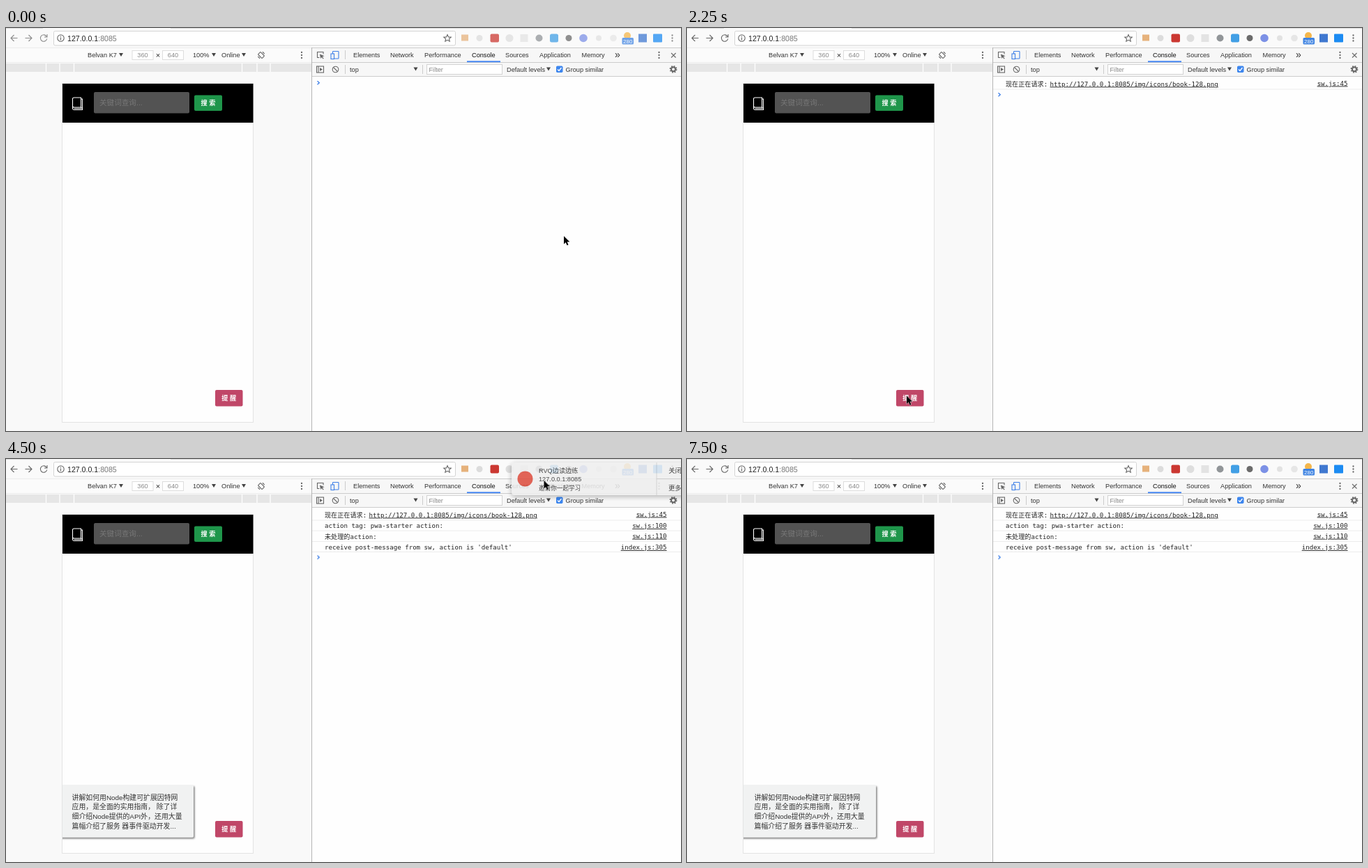
An HTML page for the animation above (7.75 s loop, 968 by 579 pixels).

```html
<!DOCTYPE html>
<html lang="zh">
<head>
<meta charset="utf-8">
<title>Notification demo</title>
<style>
html, body { margin: 0; width: 100%; height: 100%; overflow: hidden; background: #fff; }
svg { display: block; width: 100%; height: 100%; }
text { font: 9.2px "Liberation Sans", "Noto Sans CJK SC", "Noto Sans CJK", sans-serif; fill: #333; white-space: pre; }
.mono text { font: 9.12px "DejaVu Sans Mono", "Noto Sans CJK SC", "Noto Sans CJK", monospace; fill: #222; }
.mono .link { text-decoration: underline; }
.mono .src { text-anchor: end; text-decoration: underline; }
.url { font-size: 10.6px; }
.dim { fill: #888; }
.mid { text-anchor: middle; }
.btn { font-weight: bold; fill: #fff; text-anchor: middle; }
.card text { font-size: 9.88px; }
.line { fill: none; stroke: #666; stroke-width: 1.1; }
.rule { fill: none; stroke: #ccc; stroke-width: 1; }
.faint { stroke: #ececec; }

.play { animation: 7750ms step-end infinite; }
#cursor { animation-name: cursor; }
#toolbar { animation-name: focus; }
#clear { animation-name: clear; }
#first { animation-name: first; }
#rest { animation-name: rest; }
#prompt { animation-name: prompt; }
#notice { animation-name: notice; }
#icon { animation-name: icon; }
#actions { animation-name: actions; }
#card { animation-name: card; }
#hover { animation-name: hover; }

@keyframes cursor {
  0% { transform: translate(800px, 299px); }
  3.225% { transform: translate(394px, 427px); }
  6.451% { transform: translate(368px, 439px); }
  9.677% { transform: translate(331px, 495px); }
  12.903% { transform: translate(314.5px, 522px); }
  16.129% { transform: translate(315px, 528.5px); }
  38.709% { transform: translate(624px, 258px); }
  41.935% { transform: translate(630px, 248px); }
  45.161% { transform: translate(732px, 71px); }
  48.387% { transform: translate(763px, 35px); }
  51.612% { transform: translate(771.5px, 31px); opacity: 1; }
  74.193%, 100% { transform: translate(771.5px, 31px); opacity: 0; }
}
@keyframes focus { 0% { opacity: .75; } 19.354%, 100% { opacity: 1; } }
@keyframes clear { 0% { opacity: 0; } 19.354% { opacity: 1; } 25.806%, 100% { opacity: 0; } }
@keyframes first { 0% { opacity: 0; } 29.032%, 100% { opacity: 1; } }
@keyframes rest { 0% { opacity: 0; } 58.064%, 100% { opacity: 1; } }
@keyframes prompt {
  0% { transform: translateY(0); }
  29.032% { transform: translateY(17px); }
  58.064%, 100% { transform: translateY(62.5px); }
}
@keyframes notice {
  0% { transform: translateX(300px); opacity: 1; }
  32.258% { transform: translateX(137px); opacity: 1; }
  35.483% { transform: none; opacity: 1; }
  58.064% { transform: translateX(32px); opacity: .88; }
  61.290% { transform: translateX(110px); opacity: .4; }
  64.516%, 100% { transform: translateX(300px); opacity: 0; }
}
@keyframes icon { 0% { opacity: 1; } 48.387% { opacity: .4; } 51.612%, 100% { opacity: 0; } }
@keyframes actions { 0% { opacity: 0; } 48.387% { opacity: .6; } 51.612%, 100% { opacity: 1; } }
@keyframes card {
  0% { transform: translateX(-200px); }
  58.064% { transform: translateX(-2px); }
  61.290%, 100% { transform: none; }
}
@keyframes hover { 0% { opacity: 0; } 64.516% { opacity: 1; } 74.193%, 100% { opacity: 0; } }
</style>
</head>
<body>
<svg viewBox="0 0 968 579" preserveAspectRatio="none">
  <defs>
    <filter id="soft" x="-10%" y="-30%" width="120%" height="170%"><feDropShadow dx="0" dy="2" stdDeviation="3.5" flood-opacity=".32"/></filter>
    <filter id="drop" x="-5%" y="-10%" width="112%" height="130%"><feDropShadow dx="1.5" dy="2" stdDeviation="1.3" flood-opacity=".5"/></filter>
    <clipPath id="screen"><rect x="81" y="80" width="273" height="486"/></clipPath>
    <path id="caret" d="M0 0h6l-3 5z" fill="#444"/>
    <g id="kebab" fill="#666"><circle cy="-4" r="1.15"/><circle r="1.15"/><circle cy="4" r="1.15"/></g>
  </defs>
  <rect width="968" height="579" fill="#fefefe"/>

  <!-- Browser toolbar -->
  <rect width="968" height="28" fill="#fafafa"/>
  <path class="rule" d="M0 .3H53M236 .3H968" stroke-opacity=".8"/>
  <rect x="68.5" y="4.5" width="576" height="20.5" rx="2" fill="#fff" stroke="#d4d4d4"/>
  <g class="line">
    <circle cx="78.5" cy="14.5" r="4.7"/><path d="M78.5 13.5v4M78.5 11.3v1.2"/>
    <path d="M633 9.5l1.5 3.4 3.7.3-2.8 2.4.9 3.6-3.3-1.9-3.2 1.9.8-3.6-2.8-2.4 3.7-.3z"/>
  </g>
  <text class="url" x="88" y="18.5" style="fill:#222">127.0.0.1<tspan fill="#777">:8085</tspan></text>
  <g id="toolbar" class="play">
    <path class="line" d="M16.5 14.5H7m4.5-4.5L7 14.5l4.5 4.5M27.500 14.500H37m-4.500-4.500l4.500 4.500-4.500 4.500M58.200 12.200A4.700 4.700 0 1 0 58.700 15.500M59 9v4h-4"/>
    <rect x="653" y="9.500" width="10" height="9" fill="#e6b27c"/>
    <circle cx="679" cy="14.500" r="4.500" fill="#dcdcdc"/>
    <rect x="694.500" y="8.500" width="12.500" height="12" rx="2" fill="#cb3832"/>
    <circle cx="722" cy="14.500" r="5.500" fill="#dedede"/>
    <rect x="737.500" y="9" width="11" height="11" fill="#e3e3e3"/>
    <circle cx="764.500" cy="14.500" r="5" fill="#919598"/>
    <rect x="780" y="8.500" width="12" height="12" rx="2.500" fill="#429fe5"/>
    <circle cx="807" cy="14.500" r="4.500" fill="#6b6b6b"/>
    <circle cx="828" cy="14.500" r="5.800" fill="#7c91e6"/>
    <circle cx="850" cy="14.500" r="4" fill="#e2e2e2"/>
    <circle cx="871" cy="14.500" r="4.800" fill="#e6e6e6"/>
    <circle cx="891" cy="11" r="5" fill="#f4b64b"/>
    <rect x="883.500" y="14" width="16.500" height="9.500" rx="1.500" fill="#3e83e2"/>
    <text class="mid" x="891.700" y="21.700" style="font-size:8px;fill:#fff">280</text>
    <rect x="907" y="8.500" width="12" height="12" fill="#4078d0"/>
    <rect x="928" y="8.500" width="13" height="12" rx="1" fill="#1c8bf2"/>
    <use href="#kebab" x="955.500" y="14.500"/>
  </g>

  <!-- Device toolbar and ruler -->
  <rect y="28" width="438" height="22" fill="#fbfbfb"/>
  <path class="rule faint" d="M0 28.500H438M0 49.500H438"/>
  <g>
    <text x="117" y="42">Belvan K7</text><use href="#caret" x="162" y="36"/>
    <rect x="181" y="32.500" width="30" height="13" fill="#fff" stroke="#ddd"/><text class="mid dim" x="196" y="42">360</text>
    <text class="mid" x="218" y="42.500" style="font-size:11px">×</text>
    <rect x="224.500" y="32.500" width="30" height="13" fill="#fff" stroke="#ddd"/><text class="mid dim" x="239.500" y="42">640</text>
    <text x="268" y="42">100%</text><use href="#caret" x="295" y="36"/>
    <text x="309" y="42">Online</text><use href="#caret" x="338" y="36"/>
    <g class="line" transform="translate(366 39) rotate(-45)"><rect x="-2.500" y="-4" width="5" height="8" rx=".8"/><path d="M-4.700-2v4M4.700-2v4"/></g>
    <use href="#kebab" x="424" y="39"/>
  </g>
  <rect y="50" width="438" height="529" fill="#f9f9f9"/>
  <rect y="51" width="438" height="12" fill="#e6e6e6"/>
  <path d="M57.500 51v12M77 51v12M97.500 51v12M338.500 51v12M360 51v12M379 51v12" stroke="#fff" stroke-width="1.300"/>

  <!-- Phone page -->
  <rect x="80.500" y="79.500" width="274" height="487" fill="#fefefe" stroke="#e4e4e4"/>
  <rect x="81" y="80" width="273.500" height="56"/>
  <g fill="none" stroke="#fff" stroke-width="1.100">
    <path d="M97.500 100h10v14h-10a2 2 0 0 1-2-2v-10a2 2 0 0 1 2-2zM95.500 112v3a2.200 2.200 0 0 0 2.200 2.500h11.800V102h-2M97.500 115.700h10.500v-2"/>
  </g>
  <rect x="126" y="92" width="137" height="30.500" rx="2" fill="#535353"/>
  <text x="134" y="111" style="font-size:10.600px;fill:#777">关键词查询...</text>
  <rect x="270" y="96.500" width="40" height="22.500" rx="2" fill="#1f964b"/>
  <text class="btn" x="290" y="111">搜 索</text>
  <rect x="300" y="520" width="39.500" height="23.500" rx="2" fill="#c04768"/>
  <text class="btn" x="319.700" y="535">提 醒</text>
  <g clip-path="url(#screen)">
    <g id="card" class="play card">
      <rect x="71" y="468" width="200" height="75.500" rx="2" fill="#f1f2f2" filter="url(#drop)"/>
      <text x="96.500" y="489.500">讲解如何用Node构建可扩展因特网</text>
      <text x="96.500" y="503.300">应用，是全面的实用指南， 除了详</text>
      <text x="96.500" y="517">细介绍Node提供的API外，还用大量</text>
      <text x="96.500" y="530.800">篇幅介绍了服务 器事件驱动开发...</text>
    </g>
  </g>

  <!-- Developer tools -->
  <rect x="439" y="28" width="529" height="41" fill="#f7f7f7"/>
  <path class="rule" d="M438.500 28V579" style="stroke:#b5b5b5"/>
  <path class="rule" d="M439 28.500H968M439 49.500H968M439 69.500H968M486.500 32v13M486.500 53v13M597.500 53v13"/>
  <rect id="hover" class="play" x="758" y="29" width="60" height="20" fill="#e8e8e8"/>
  <g class="line">
    <path d="M449.500 42.500h-3v-8h8.500v3"/><path d="M450 37.500l6.500 2.700-2.800 1 2 2.500-1 .8-2-2.500-1.500 2z" fill="#666" stroke="none"/>
    <g style="stroke:#3d7fe8"><rect x="468.500" y="33.500" width="8.500" height="10.500" rx=".8"/><rect x="466" y="37" width="4.500" height="7.500" fill="#f7f7f7"/></g>
  </g>
  <text x="498" y="42">Elements</text><text x="551" y="42">Network</text><text x="600" y="42">Performance</text>
  <text x="668" y="42" style="fill:#111">Console</text><text x="716" y="42">Sources</text><text x="765" y="42">Application</text>
  <text x="825.500" y="42">Memory</text><text x="873" y="43" style="font-size:14px">»</text>
  <rect x="661" y="47.300" width="48" height="1.900" fill="#4285f4"/>
  <use href="#kebab" x="936.500" y="39"/>
  <path class="line" d="M954 36l6.500 6.500m0-6.500l-6.500 6.500"/>

  <rect id="clear" class="play" x="463" y="51" width="18" height="17" fill="#e2e2e2"/>
  <g class="line">
    <rect x="445.500" y="55" width="10" height="9"/><path d="M448 55v9"/><path d="M450 57l4 2.500-4 2.500z" fill="#666" stroke="none"/>
    <circle cx="472.500" cy="59.500" r="4.300"/><path d="M469.500 56.500l6 6"/>
    <circle cx="957" cy="59.300" r="3" stroke-width="2"/><circle cx="957" cy="59.300" r="4.600" stroke-width="1.600" stroke-dasharray="1.800 1.813"/>
  </g>
  <text x="493" y="62.500">top</text><use href="#caret" x="584.500" y="56.500"/>
  <rect x="603.500" y="52.500" width="108" height="14" fill="#fff" stroke="#d2d2d2"/>
  <text class="dim" x="606.500" y="63">Filter</text>
  <text x="718" y="62.500">Default levels</text><use href="#caret" x="775" y="56.500"/>
  <rect x="789" y="54.500" width="9.500" height="9.500" rx="1.800" fill="#3d86ee"/>
  <path d="M791 59.500l2 2 3.500-4.500" fill="none" stroke="#fff" stroke-width="1.300"/>
  <text x="802.500" y="62.500">Group similar</text>

  <g class="mono">
    <g id="first" class="play">
      <text x="457" y="83.500">现在正在请求:</text>
      <text class="link" x="520.500" y="83.500">http://127.0.0.1:8085/img/icons/book-128.png</text>
      <text class="src" x="947.500" y="82.500">sw.js:45</text>
      <path class="rule faint" d="M439 88H968"/>
    </g>
    <g id="rest" class="play">
      <text x="457" y="99">action tag: pwa-starter action:</text><text class="src" x="947.500" y="99">sw.js:100</text>
      <text x="457" y="115">未处理的action:</text><text class="src" x="947.500" y="113.700">sw.js:110</text>
      <text x="457" y="130">receive post-message from sw, action is 'default'</text><text class="src" x="947.500" y="130">index.js:305</text>
      <path class="rule faint" d="M439 103H968M439 118.500H968M439 133.500H968"/>
    </g>
  </g>
  <path id="prompt" class="play" d="M446.500 76.300l2.800 2.500-2.800 2.500" fill="none" stroke="#3d7fe8" stroke-width="1.300"/>

  <!-- System notification -->
  <g id="notice" class="play">
    <rect x="693" y="5" width="262" height="47" rx="4.500" fill="#eeeeee" filter="url(#soft)"/>
    <circle cx="712.500" cy="28.500" r="11" fill="#dd4f40"/>
    <text x="732" y="19.800" style="font-weight:500">RVQ边读边练</text>
    <text x="732" y="32">127.0.0.1:8085</text>
    <text x="732" y="44.500" style="font-size:8.600px">邀请你一起学习</text>
    <g id="icon" class="play" stroke="#34495e">
      <rect x="919.500" y="14.500" width="22" height="27.500" rx="2" fill="#5aa887"/>
      <rect x="919.500" y="14.500" width="19" height="24.500" rx="1.500" fill="#78c9a2"/>
      <path d="M922 14.500h5v8l-2.500-2-2.500 2z" fill="#d9536a" stroke-width=".7"/>
      <path d="M929 23.500h7M923 27.500h3M929 27.500h7M924 31h11M927 34.500h8" fill="none"/>
    </g>
    <g id="actions" class="play">
      <path class="rule" d="M901 5V52M901 28.500H955"/>
      <text class="mid" x="927.500" y="20">关闭</text>
      <text x="918" y="44.500">更多</text>
      <path class="line" d="M941 41l2.500 2.300 2.500-2.300"/>
    </g>
  </g>

  <path id="cursor" class="play" d="M0 0V11.500L2.700 9 4.600 13.200 6.500 12.400 4.700 8.300H8.300Z" fill="#000" stroke="#fff" stroke-width=".9" paint-order="stroke"/>
</svg>
</body>
</html>
```
